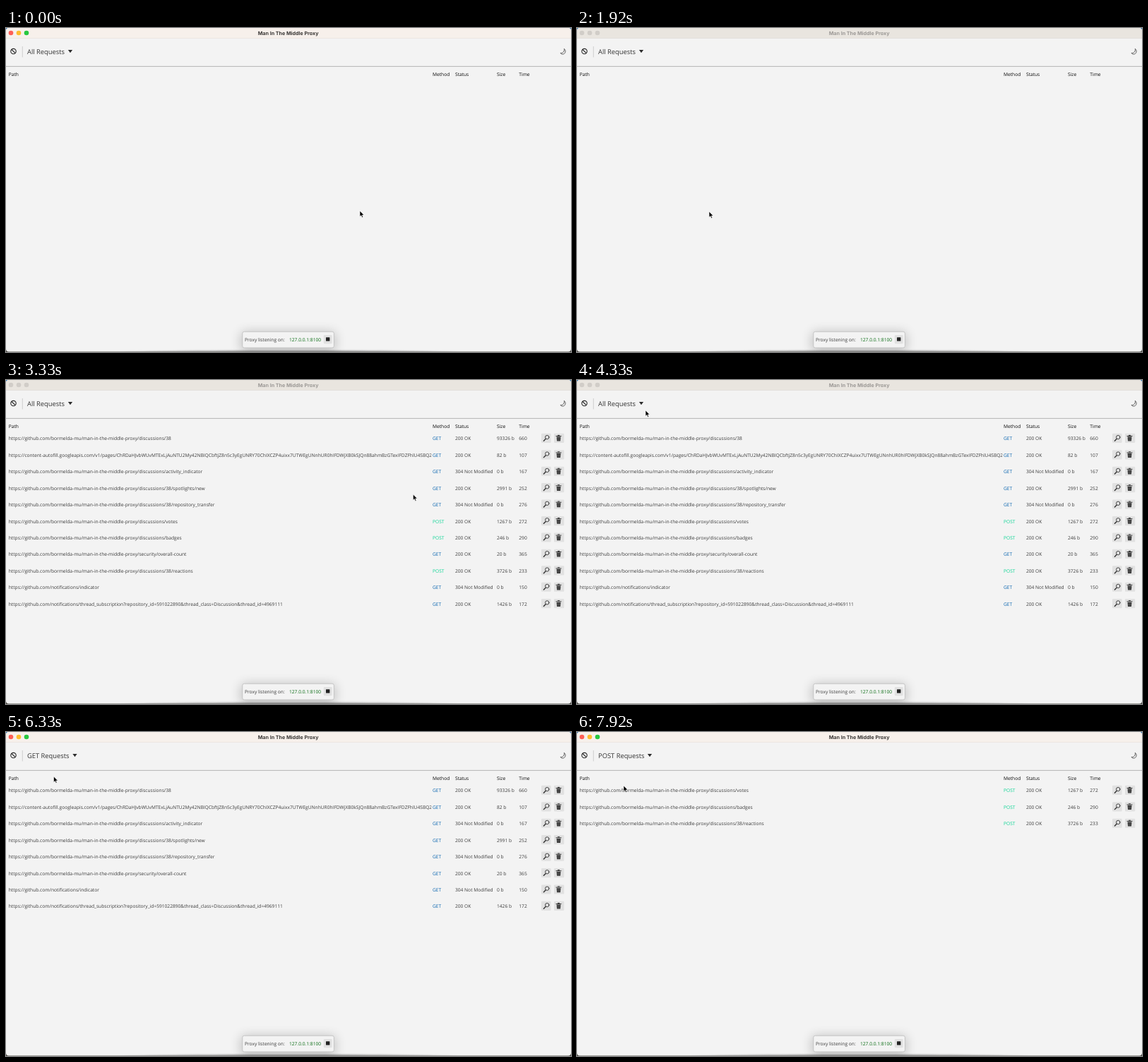
These frames come from a looping animation (800x459 px, 8000 ms). An HTML page:

```html
<!DOCTYPE html>
<html lang="en">
<head>
<meta charset="utf-8">
<title>Man In The Middle Proxy</title>
<style>
  html, body { margin: 0; width: 100%; height: 100%; overflow: hidden; background: #f3f3f3; }
  svg { display: block; width: 800px; height: 459px; }
  text {
    font: 6.65px "Open Sans", "Noto Sans", sans-serif;
    fill: #3c3c3c; white-space: pre; text-rendering: geometricPrecision;
  }
  .title { font: 700 7.15px Inter, sans-serif; text-anchor: middle; }
  .big { font-size: 9.35px; fill: #333; }
  .head { fill: #0c0c0c; }
  .GET { fill: #0b66b0; }
  .POST { fill: #10d596; }
  .addr { fill: #0a6c14; }
</style>
</head>
<body>
<svg viewBox="0 0 800 459" xmlns="http://www.w3.org/2000/svg">
  <defs>
    <linearGradient id="desk" x2="0" y2="1">
      <stop offset="0" stop-color="#2f79b5"/><stop offset="1" stop-color="#4b4a44"/>
    </linearGradient>
    <filter id="soft" x="-50%" y="-100%" width="200%" height="300%"><feGaussianBlur stdDeviation="8"/></filter>
    <filter id="blur" x="-10%" y="-200%" width="120%" height="500%"><feGaussianBlur stdDeviation="5 1.2"/></filter>
    <clipPath id="win"><rect width="800" height="458.6" rx="4"/></clipPath>
    <clipPath id="pathCol"><rect y="70" width="602.5" height="380"/></clipPath>
    <g id="tools" stroke-linecap="round">
      <rect x="758" y="-6.6" width="13.6" height="13.2" rx="1.2" fill="#e1e1e1"/>
      <rect x="776" y="-6.6" width="14.2" height="13.2" rx="1.2" fill="#e1e1e1"/>
      <circle cx="766.2" cy="-1.3" r="2.7" fill="none" stroke="#333" stroke-width=".9"/>
      <path d="M764 1.1L761.4 3.8" stroke="#333" stroke-width="1.4"/>
      <path d="M779 -2.9H786M781.4 -4H783.6" stroke="#333" stroke-width="1"/>
      <path d="M779.6 -1.8H785.4L784.9 4.2H780.1Z" fill="#333"/>
      <path d="M781.5 -.6V3M783.5 -.6V3" stroke="#999" stroke-width=".4"/>
    </g>
  </defs>
  <rect width="800" height="459" fill="url(#desk)"/>
  <g clip-path="url(#win)">
    <rect width="800" height="459" fill="#f3f3f3"/>
    <g id="bar"></g>
    <g fill="none" stroke="#262626">
      <circle cx="10.5" cy="33.1" r="3.7" stroke-width="1.1"/>
      <path d="M7.9 30.5L13.1 35.7" stroke-width="1.1"/>
      <path d="M23.3 26V41.5" stroke="#c6c6c6" stroke-width=".8"/>
      <path d="M0 54.4H800" stroke="#b4b4b4" stroke-width="1"/>
      <path d="M790.3 29.4C793.6 32 792 36.9 788.4 37.1C786.8 37.2 785.6 36.5 785.1 35.5C788.6 36 791 33 790.3 29.4Z" stroke-width=".7"/>
    </g>
    <g id="heads"></g>
    <g id="rows"></g>
    <ellipse cx="400" cy="460.5" rx="238" ry="3.6" fill="#666" opacity=".75" filter="url(#blur)"/>
    <rect x="333" y="431" width="133" height="27" rx="4" opacity=".22" filter="url(#soft)"/>
    <rect x="334.8" y="430.2" width="129.6" height="22.8" rx="2.5" fill="#f3f3f3" stroke="#bdbdbd" stroke-width=".8"/>
    <text x="338" y="444.2">Proxy listening on:</text>
    <text x="401" y="444.2" class="addr">127.0.0.1:8100</text>
    <rect x="449.8" y="435" width="11.8" height="12.2" rx="1.2" fill="#e1e1e1"/>
    <rect x="453" y="438.2" width="5.4" height="5.4" rx=".5" fill="#222"/>
    <g id="menu"></g>
  </g>
  <path id="cursor" d="M0 0V8.2L1.9 6.5L3.2 9.4L4.6 8.8L3.3 6H5.9Z" fill="#000" stroke="#fff" stroke-width=".6"/>
</svg>
<script>
const LOOP = 8000, FPS = 12;
const $ = id => document.getElementById(id);
const text = (x, y, s, cls = '') => `<text x="${x}" y="${y}" class="${cls}">${s}</text>`;
const rect = (x, y, w, h, attrs) => `<rect x="${x}" y="${y}" width="${w}" height="${h}" ${attrs}/>`;

const HUB = 'https://github.com/';
const REPO = HUB + 'bormelda-mu/man-in-the-middle-proxy/';
const OK = '200 OK', SAME = '304 Not Modified';

// arrival time, path, method, status, size, duration
const requests = [
  [2250, REPO + 'discussions/38', 'GET', OK, 93326, 660],
  [2420, 'https://content-autofill.googleapis.com/v1/pages/ChRDaHJvbWUvMTExLjAuNTU2My42NBIQCbftjZ8n5c3yEgUNRY70ChIXCZP4uixx7UTWEgUNnhUR0hIFDWjXB0kSJQn88ahmBzGTexIFDZFhlU4SBQ2', 'GET', OK, 82, 107],
  [2500, REPO + 'discussions/activity_indicator', 'GET', SAME, 0, 167],
  [2500, REPO + 'discussions/38/spotlights/new', 'GET', OK, 2991, 252],
  [2580, REPO + 'discussions/38/repository_transfer', 'GET', SAME, 0, 276],
  [2580, REPO + 'discussions/votes', 'POST', OK, 1267, 272],
  [2670, REPO + 'discussions/badges', 'POST', OK, 246, 290],
  [2670, REPO + 'security/overall-count', 'GET', OK, 20, 365],
  [2750, REPO + 'discussions/38/reactions', 'POST', OK, 3726, 233],
  [2750, HUB + 'notifications/indicator', 'GET', SAME, 0, 150],
  [2830, HUB + 'notifications/thread_subscription?repository_id=591022890&amp;thread_class=Discussion&amp;thread_id=4969111', 'GET', OK, 1426, 172],
];
const filters = ['All', 'GET', 'POST', 'PUT', 'DELETE', 'PATCH', 'HEAD'];
const labelEnd = { All: 83, GET: 89.5, POST: 95 };

// time, x, y
const moves = [
  [0, 501, 259], [80, 501, 259], [500, 187, 260], [2250, 187, 260],
  [2920, 662, 176], [3330, 576.5, 162], [3830, 130, 60], [4330, 97, 43],
  [4580, 88, 34], [4920, 88, 34], [5330, 67.5, 62], [5500, 67.5, 63],
  [6330, 67.5, 63], [6580, 84, 34], [6750, 84, 34], [7000, 67, 75],
  [7580, 67, 75], [7920, 66, 76], [LOOP, 66, 76],
];

function cursorAt(t) {
  const i = Math.max(1, moves.findIndex(m => m[0] >= t));
  const [t0, x0, y0] = moves[i - 1], [t1, x1, y1] = moves[i];
  const p = (t - t0) / (t1 - t0), e = p * p * (3 - 2 * p);
  return [x0 + (x1 - x0) * e, y0 + (y1 - y0) * e];
}

function drawBar(active) {
  const lights = active ? ['#fe5f57', '#febc2e', '#28c840'] : Array(3).fill('#d1cdc8');
  return rect(0, 0, 800, 14.6, `fill="${active ? '#f7f0eb' : '#e9e5df'}"`) +
    rect(0, 14.3, 800, .6, `fill="${active ? '#e6dfda' : '#dcd8d3'}"`) +
    lights.map((c, i) => `<circle cx="${7 + 11 * i}" cy="7" r="3.3" fill="${c}"/>`).join('') +
    `<text x="399.6" y="9.5" class="title" style="fill:${active ? '#3b3836' : '#9c9996'}">Man In The Middle Proxy</text>`;
}

function drawRows(t, filter) {
  return requests
    .filter(r => t >= r[0] && (filter === 'All' || r[2] === filter))
    .map(([, path, method, status, size, time], i) => {
      const y = 83 + 23.43 * i, base = y + 2.4;
      return `<g clip-path="url(#pathCol)">${text(3.8, base, path)}</g>` +
        text(604, base, method, method) + text(636, base, status) +
        text(695, base, size + ' b') + text(726.3, base, time) +
        `<use href="#tools" y="${y - .6}"/>`;
    }).join('');
}

function drawMenu(filter, open, hot, hover) {
  const end = labelEnd[filter], right = end + 13, w = right - 29;
  let s = '';
  if (open) {
    s += rect(29, 42, w, 114, 'opacity=".24" filter="url(#soft)"') +
      rect(29.2, 39.6, w - .4, 112.6, 'rx="1.5" fill="#f3f3f3" stroke="#c2c2c2" stroke-width=".7"') +
      rect(right - 7.6, 42, 4.6, 109, 'rx="1.5" fill="#e9e9e9"') +
      rect(right - 7.6, 42, 4.6, 80, 'rx="1.5" fill="#cbcbcb"');
    filters.forEach((f, i) => {
      const mid = 49.3 + 15.35 * i;
      const fill = f === filter ? '#62c2f4' : i === hot ? '#d2d2d2' : 'none';
      const line = i === hot ? '#4c4c4c' : 'none';
      s += rect(32.4, mid - 6.7, w - 13.2, 13.4, `rx="1" fill="${fill}" stroke="${line}" stroke-width=".8"`) +
        text(34.8, mid + 3.4, f, 'big');
    });
  }
  if (open || hover) {
    const fill = open ? '#cacaca' : '#dadada';
    s += rect(29, 26.9, w, 12.8, `rx="1" fill="${fill}" stroke="#8c8c8c" stroke-width=".7"`);
  }
  return s + text(30, 36.6, filter + ' Requests', 'big') +
    `<path d="M${end + 4.9} 31H${end + 11.1}L${end + 8} 35.2Z" fill="#2b2b2b"/>`;
}

const last = {};
function paint(id, key, draw) {
  if (last[id] === key) return;
  last[id] = key;
  $(id).innerHTML = draw();
}

function render(now) {
  const t = Math.floor(now % LOOP * FPS / 1000 + .1) / FPS * 1000 + 1;
  const [x, y] = cursorAt(Math.min(t, LOOP));
  const active = t < 1250 || t >= 4500;
  const filter = t < 5750 ? 'All' : t < 7500 ? 'GET' : 'POST';
  const open = t >= 4830 && t < 5750 || t >= 6660 && t < 7500;
  const inside = x > 29 && x < labelEnd[filter] + 13;
  const hot = open && inside && y > 42 ? Math.floor((y - 41.6) / 15.35) : -1;
  const hover = active && inside && y > 27 && y < 39.5;
  const arrived = requests.filter(r => t >= r[0]).length;

  paint('bar', active, () => drawBar(active));
  paint('rows', arrived + filter, () => drawRows(t, filter));
  paint('menu', [filter, open, hot, hover].join(), () => drawMenu(filter, open, hot, hover));
  $('cursor').setAttribute('transform', `translate(${x.toFixed(2)} ${y.toFixed(2)})`);
}

$('heads').innerHTML = [[3.8, 'Path'], [604, 'Method'], [636, 'Status'], [695, 'Size'], [726.3, 'Time']]
  .map(([x, s]) => text(x, 67.6, s, 'head')).join('');

const start = performance.now();
function tick() {
  render(performance.now() - start);
  requestAnimationFrame(tick);
}
tick();
</script>
</body>
</html>
```
